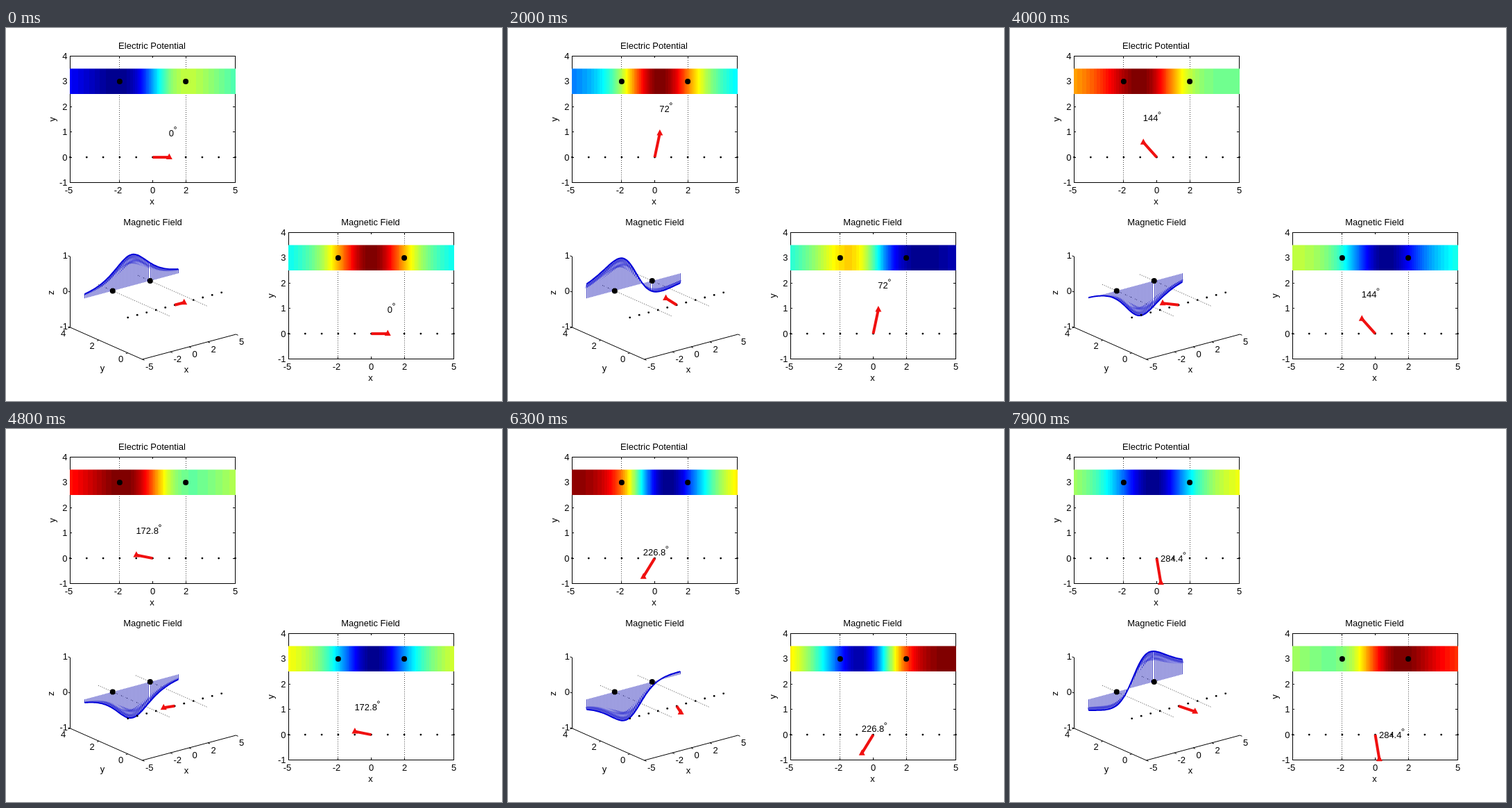
An HTML page with a canvas that plays this animation: 715x537 px, repeating every 8 s.

```html
<!DOCTYPE html>
<html lang="en">
<head>
<meta charset="utf-8">
<title>Rotating dipole</title>
<style>
html, body { margin: 0; width: 100%; height: 100%; overflow: hidden; background: #fff; }
canvas { display: block; }
</style>
</head>
<body>
<canvas id="stage" width="715" height="537"></canvas>
<script>
const g = document.getElementById('stage').getContext('2d');
const STEP = 100, STEPS = 80, DEG_PER_STEP = 3.6;
const RED = '#f01010', BLUE = '#0000d8', STEM = '#3c3cc0';
const clamp = v => Math.max(0, Math.min(1, v));

// Dipole field of direction a, seen along the line y = 3
const field = (x, a) => (x * Math.cos(a) + 3 * Math.sin(a)) / (x * x + 9) ** 1.5;
const range = (n, f) => Array.from({ length: n }, (_, i) => f(i));
const px = v => Math.floor(v) + 0.5;

function jet(c) {
  const v = Math.min(64, Math.floor(clamp(c) * 64) + 1) / 64;
  const ch = s => Math.round(255 * clamp(Math.min(4 * v - s, s + 3 - 4 * v)));
  return `rgb(${ch(1.5)},${ch(0.5)},${ch(-0.5)})`;
}

function text(s, x, y, align = 'center') {
  g.textAlign = align;
  g.fillStyle = '#000';
  g.fillText(s, x, y + 4.5);
}

function vertical(s, x, y) {
  g.save();
  g.translate(x, y);
  g.rotate(-Math.PI / 2);
  text(s, 0, 0);
  g.restore();
}

function line(points, color = '#000', width = 1, dash = []) {
  g.strokeStyle = color;
  g.lineWidth = width;
  g.setLineDash(dash);
  g.beginPath();
  points.forEach(p => g.lineTo(p[0], p[1]));
  g.stroke();
  g.setLineDash([]);
}

function dot([x, y], r) {
  g.fillStyle = '#000';
  g.beginPath();
  g.arc(x, y, r, 0, 7);
  g.fill();
}

function arrow(from, to) {
  line([from, to], RED, 4);
  const [x, y] = to;
  g.fillStyle = RED;
  g.beginPath();
  g.moveTo(x, y - 5.5);
  g.lineTo(x + 4.5, y + 3);
  g.lineTo(x - 4.5, y + 3);
  g.fill();
}

function flatPlot(left, top, title, a, turn, lo, hi) {
  const W = 238, H = 182;
  const at = (x, y) => [left + 0.5 + (x + 5) * 23.8, top + 0.5 + (4 - y) * 36.4];

  g.strokeStyle = '#000';
  g.lineWidth = 1;
  g.strokeRect(left + 0.5, top + 0.5, W, H);
  for (const x of [-5, -2, 0, 2, 5]) {
    const u = px(at(x, 0)[0]);
    line([[u, top], [u, top + 3]]);
    line([[u, top + H], [u, top + H - 3]]);
    text(x, u - (x < 0 ? 2 : 0), top + 193.5);
  }
  for (let y = -1; y <= 4; y++) {
    const v = px(at(0, y)[1]);
    line([[left, v], [left + 3, v]]);
    line([[left + W, v], [left + W - 3, v]]);
    text(y, left - 3.5, v, 'right');
  }
  text(title, left + 118.5, top - 14.5);
  text('x', left + 118.5, top + 209.5);
  vertical('y', left - 25.5, top + 91.5);

  for (const x of [-2, 2]) {
    const u = px(at(x, 0)[0]);
    line([[u, top], [u, top + H]], '#444', 1, [1, 2]);
  }
  for (let i = 0; i <= W; i++) {
    const v = field(i / 23.8 - 5, a + turn);
    g.fillStyle = jet((v - lo) / (hi - lo));
    g.fillRect(left + i, top + 18.5, 1, 36.5);
  }
  for (const x of [-2, 2]) dot(at(x, 3), 4);
  for (let x = -5; x <= 5; x++) dot(at(x, 0), 1.4);

  const c = Math.cos(a), s = Math.sin(a);
  arrow(at(0, 0), at(c, s));
  const label = String(+(a * 180 / Math.PI).toFixed(1));
  const [tx, ty] = at(c, s + 1);
  text(label, tx - 0.5, ty + 1.5, 'left');
  g.strokeStyle = '#000';
  g.lineWidth = 0.8;
  g.beginPath();
  g.arc(tx + g.measureText(label).width + 1.5, ty - 6, 1.5, 0, 7);
  g.stroke();
}

const project = (x, y, z) => [
  196.5 + (x + 5) * 13.5 - (y + 1) * 20.8,
  477 - (x + 5) * 3.6 - (y + 1) * 9.2 - (z + 1) * 51
];

function spacePlot(a) {
  const tick = ([x, y], dx, dy) => line([[x, y], [x + dx, y + dy]]);
  text('Magnetic Field', 211.5, 279.5);
  line([[92.5, 329], [92.5, 431], project(-5, -1, -1), project(5, -1, -1)]);
  for (const x of [-5, -2, 0, 2, 5]) {
    const p = project(x, -1, -1);
    tick(p, 3, 1.3);
    text(x, p[0] + 4.5, p[1] + 10.5, 'left');
  }
  for (const y of [0, 2, 4]) {
    const p = project(-5, y, -1);
    tick(p, -3, 0.8);
    text(y, p[0] - 10, p[1] + 8.5);
  }
  for (const z of [-1, 0, 1]) {
    const p = project(-5, 4, z);
    tick(p, -3, -1);
    text(z, 89, p[1] - 1.5, 'right');
  }
  text('x', 260, 491.5);
  text('y', 139, 489.5);
  vertical('z', 64, 381);

  for (const x of [-2, 2])
    line([project(x, 4, 0), project(x, -1, 0)], '#444', 1, [1, 2]);

  // Arrows along y = 3, scaled so that the longest has a fixed length
  const xs = range(68, i => i / 6.7 - 5);
  const values = xs.map(x => field(x, a + Math.PI / 2));
  const peak = Math.max(...values.map(Math.abs));
  const tips = xs.map((x, i) => {
    const [u, base] = project(x, 3, 0);
    const tip = project(x, 3, 0.88 * values[i] / peak)[1];
    const back = tip + (base - tip) * 0.28, w = Math.abs(base - tip) * 0.08;
    line([[px(u), base], [px(u), tip]], STEM);
    line([[u - w, back + w * 0.27], [u, tip], [u + w, back - w * 0.27]], BLUE, 0.5);
    return [u, tip];
  });
  line(tips, BLUE, 2);

  for (let x = -5; x <= 5; x++) dot(project(x, 0, 0), 1.4);
  for (const x of [-2, 2]) dot(project(x, 3, 0), 4);
  arrow(project(0, 0, 0), project(Math.cos(a), Math.sin(a), 0));
}

function draw(now) {
  const step = Math.floor(now / STEP) % STEPS;
  const a = step * DEG_PER_STEP * Math.PI / 180;
  const quarter = Math.PI / 2;

  // Both colour strips share one colour scale
  const all = range(101, i => i / 10 - 5).flatMap(x => [field(x, a), field(x, a + quarter)]);
  const lo = Math.min(...all), hi = Math.max(...all);

  g.fillStyle = '#fff';
  g.fillRect(0, 0, 715, 537);
  g.font = '13px "Liberation Sans", Arial, sans-serif';
  flatPlot(92, 40, 'Electric Potential', a, 0, lo, hi);
  flatPlot(407, 294, 'Magnetic Field', a, quarter, lo, hi);
  spacePlot(a);
}

const start = performance.now();
function loop() {
  draw(performance.now() - start);
  requestAnimationFrame(loop);
}
loop();
</script>
</body>
</html>
```
